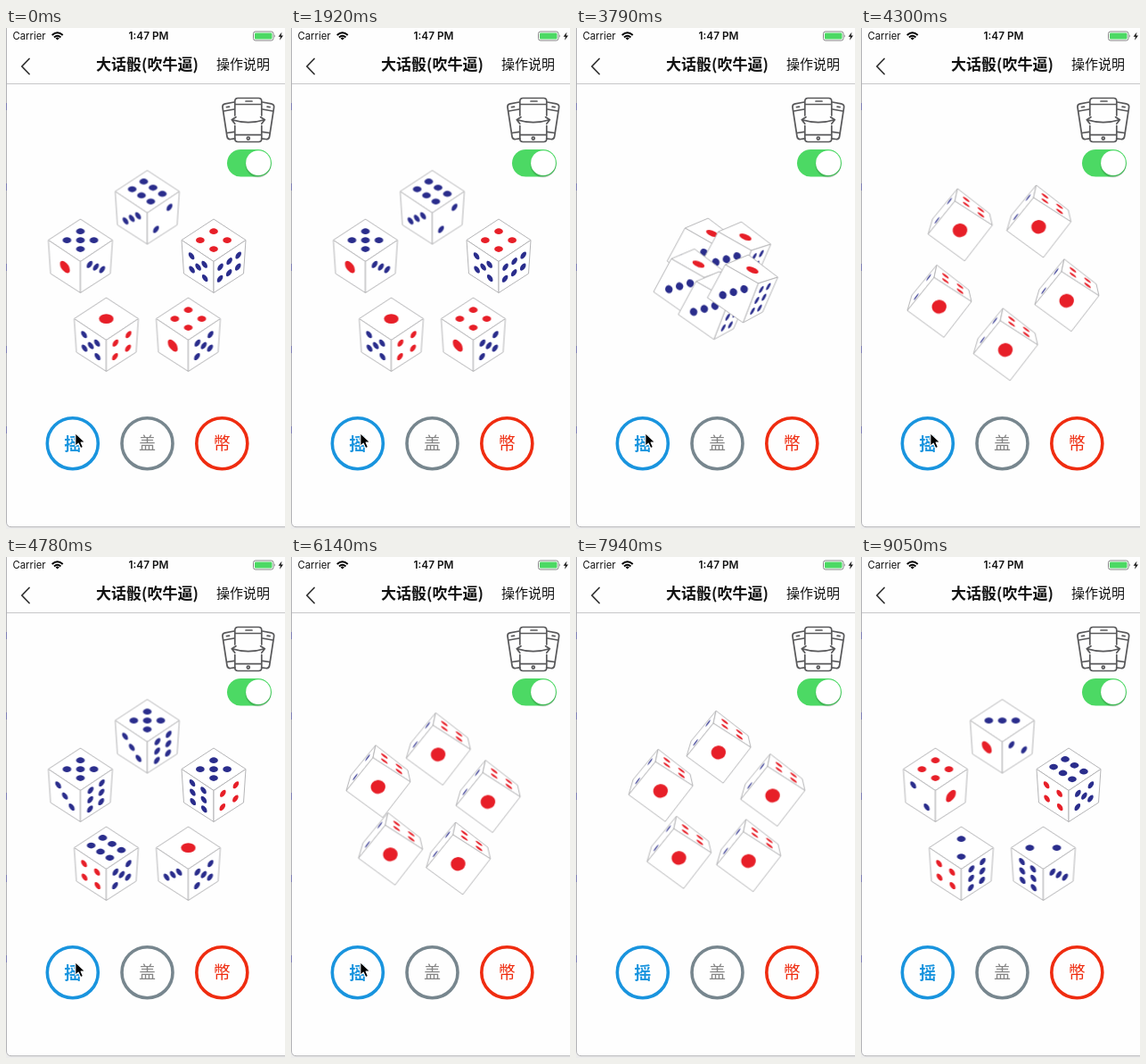
Animation, 313 px wide and 561 px high, one loop 9.1 s. Source, as an HTML page:

```html
<!DOCTYPE html>
<html lang="zh-CN">
<head>
<meta charset="utf-8">
<title>大话骰</title>
<style>
  html, body { margin: 0; width: 100%; height: 100%; overflow: hidden; background: #fff; }
  svg { display: block; width: 313px; height: 561px; }
  text { font-family: "Noto Sans CJK SC", "Noto Sans CJK JP", "Noto Sans CJK", sans-serif; text-anchor: middle; }
  .latin { font-family: Inter, Roboto, sans-serif; }
  .line { fill: none; stroke-linecap: round; stroke-linejoin: round; }
  .face { fill: #fff; stroke: #b4b4b6; stroke-width: 1; stroke-linejoin: round; }
  .die { animation: spiral 9100ms ease-in-out infinite; }
  .pose { animation: 9100ms step-end infinite; }
  #cursor { animation: leave 9100ms linear infinite; }
</style>
</head>
<body>
<svg viewBox="0 0 313 561">
  <rect width="313" height="561" fill="#fefefe"/>
  <path d="M0 553Q0 559 6 559H313V561H0Z" fill="#ececec"/>
  <path class="line" d="M.5 0V553Q.5 558.7 6 558.7H313" stroke="#b2b2b5"/>
  <path d="M.5 84v8m0 82v8m0 82v8m0 84v8m0 82v8" stroke="#7f7fb4"/>

  <g class="latin" fill="#111">
    <text class="latin" x="26" y="13.3" font-size="11.3">Carrier</text>
    <text class="latin" x="160" y="13.3" font-size="11.8" font-weight="600">1:47 PM</text>
  </g>
  <g class="line" stroke="#000" stroke-width="2" style="stroke-linecap:butt">
    <path d="M51.7 8Q57.7 2.4 63.7 8M54 10.4Q57.7 7 61.4 10.4"/>
    <path d="M55.6 11.4Q57.7 9.7 59.8 11.4L57.7 13.6Z" fill="#000" stroke="none"/>
  </g>
  <rect x="277.5" y="4" width="22.5" height="10" rx="2.4" fill="none" stroke="#777" stroke-width=".9"/>
  <rect x="279" y="5.5" width="19.5" height="7" rx="1" fill="#4cd964"/>
  <path d="M301.2 7.2q1.6 1.8 0 3.6z" fill="#777"/>
  <path d="M309.5 4.5L305.6 9.7H308L306.9 13.7L311 8.4H308.5Z" fill="#111"/>

  <path class="line" d="M26 34.5L17.8 43L26 51.5" stroke="#333" stroke-width="1.8"/>
  <text x="158.5" y="47" font-size="17" font-weight="700" fill="#111">大话骰(吹牛逼)</text>
  <text x="266" y="46.3" font-size="15" fill="#111">操作说明</text>
  <path d="M1 62.5H313" stroke="#c6c6c8"/>

  <g class="line" stroke="#58585a" stroke-width="1.7">
    <g id="side">
      <path d="M256 83L246 84.8Q242.4 85.5 243 89L248 121.5Q248.6 125 252 124.5L257 123.8M244.5 93L256 91M248 117.5L256 116.3"/>
      <path d="M247.5 88.7l3-.5"/>
    </g>
    <use href="#side" transform="matrix(-1 0 0 1 543.6 0)"/>
    <path d="M256.8 98V82Q256.8 78.5 260.3 78.5H283.3Q286.8 78.5 286.8 82V98M256.8 109.5V124Q256.8 127.5 260.3 127.5H283.3Q286.8 127.5 286.8 124V109.5M257 85.5H286.6M257 119.7H286.6M269 82H276"/>
    <circle cx="271.8" cy="123.6" r="1.5"/>
    <path d="M253.5 102.8Q271.8 108.6 290.1 102.8M258 99.8L253.3 102.8L256.8 107.3M285.6 99.8L290.3 102.8L286.8 107.3"/>
  </g>

  <rect x="248" y="136" width="50" height="30.5" rx="15.25" fill="#4cd964"/>
  <circle cx="283" cy="153" r="14.4" fill="#000" opacity=".15"/>
  <circle cx="283" cy="151.2" r="13.9" fill="#fff"/>

  <g fill="none" stroke-width="3.6">
    <circle cx="74.8" cy="465.2" r="28.5" stroke="#1994de"/>
    <circle cx="158.5" cy="465.2" r="28.5" stroke="#77868e"/>
    <circle cx="242.3" cy="465.2" r="28.5" stroke="#ef2c10"/>
  </g>
  <g font-size="19">
    <text x="74.8" y="472.5" font-weight="700" fill="#1994de">摇</text>
    <text x="158.5" y="472" fill="#858585">盖</text>
    <text x="242.3" y="472" fill="#ef2c10" font-weight="500">幣</text>
  </g>

  <g id="dice" transform="translate(157.5 279)"></g>

  <g id="cursor">
    <path d="M77.8 453.5V468.2L81.2 465.1L83.7 470.6L86.5 469.4L84.1 464.1H88.8Z" fill="#000" stroke="#fff" stroke-width="1.1" stroke-linejoin="round"/>
  </g>
</svg>
<script>
const LOOP = 9100, ROLLS = [1984, 5785], HALF = 1250, PIC = 300, ROLL = 9 * PIC;
const BLUE = '#2a2d8c', RED = '#e71f28';
const pct = ms => (ms / LOOP * 100).toFixed(4) + '%';

// Pip places in a unit face; a negative value turns the layout.
function pips(value) {
  const n = Math.abs(value), d = .21, list = [];
  if (n === 6) {
    for (const a of [-.29, 0, .29]) for (const b of [-.18, .18]) list.push(value > 0 ? [a, b] : [b, a]);
    return list;
  }
  const k = value < 0 ? -d : d;
  if (n % 2) list.push([0, 0]);
  if (n > 1) list.push([-d, -k], [d, k]);
  if (n > 3) list.push([-d, k], [d, -k]);
  return list;
}

function face([p, q, r, s], value) {
  const mid = i => (p[i] + q[i] + r[i] + s[i]) / 4;
  const u = i => (q[i] + r[i] - p[i] - s[i]) / 2;
  const v = i => (s[i] + r[i] - p[i] - q[i]) / 2;
  const m = [u(0), u(1), v(0), v(1), mid(0), mid(1)];
  const dots = pips(value).map(([a, b]) =>
    `<circle cx="${a}" cy="${b}" r="${value === 1 ? .16 : .095}"/>`).join('');
  const color = value === 1 || value === 4 ? RED : BLUE;
  return `<polygon class="face" points="${[p, q, r, s].join(' ')}"/>` +
    `<g fill="${color}" transform="matrix(${m})">${dots}</g>`;
}

function restDie([top, left, right]) {
  const T = [0, -41], L = [-36, -17.5], R = [36, -17.5], M = [0, 6.5],
        B = [0, 41.5], l = [-33.5, 20], r = [33.5, 20];
  return face([T, R, M, L], top) + face([L, M, B, l], left) + face([M, R, r, B], right);
}

const tumbles = [
  face([[-19, -27], [7, -38], [40, -13], [18, -6]], 1) +
    face([[18, -6], [40, -13], [23, 26], [1, 38]], -6) +
    face([[-19, -27], [18, -6], [1, 38], [-39, 10]], -3),
  face([[-36, 11], [-31, -6], [-3, -40], [-6, -26]], 2) +
    face([[-6, -26], [-3, -40], [33, -12], [36, 1]], 4) +
    face([[-6, -26], [36, 1], [5, 41], [-36, 11]], 1),
  face([[-9, -36], [36, -9], [9, 36], [-36, 9]], 5)
];

// Ring place and the three results of each die, back to front.
const dice = [
  { at: [47, 64], shows: [[4, 1, 5], [1, -3, 5], [-2, -6, 3]] },
  { at: [-45, 64], shows: [[1, 5, 4], [6, 4, 5], [2, 4, -6]] },
  { at: [75.5, -24], shows: [[4, 5, 6], [5, -6, 4], [6, 4, 5]] },
  { at: [1, -78.5], shows: [[6, -3, -2], [5, 3, -6], [-3, 1, 2]] },
  { at: [-74, -24], shows: [[5, 1, 3], [5, 3, -6], [4, 2, 1]] }
];

const pose = (name, art) => `<g class="pose" style="animation-name:${name}">${art}</g>`;
document.getElementById('dice').innerHTML = dice.map(({ at: [x, y], shows }) =>
  `<g class="die" style="--x:${x}px;--y:${y}px">` +
  shows.map((s, i) => pose('rest' + i, restDie(s))).join('') +
  tumbles.map((art, i) => pose('tumble' + i, art)).join('') + '</g>').join('');

const visible = (name, spans) => `@keyframes ${name}{0%{opacity:0}` +
  spans.map(([a, b]) => `${pct(a)}{opacity:1}${pct(b)}{opacity:0}`).join('') + '}';

const [r1, r2] = ROLLS;
const rules = [[0, r1], [r1 + ROLL, r2], [r2 + ROLL, LOOP]].map((s, i) => visible('rest' + i, [s]));
for (let i = 0; i < 3; i++) {
  const spans = [];
  for (const start of ROLLS)
    for (let k = 0; k < 3; k++) {
      const a = start + (3 * k + i) * PIC;
      spans.push([a, a + PIC]);
    }
  rules.push(visible('tumble' + i, spans));
}

// Each roll spirals to the centre and out again: five turns, dice stay upright.
const place = (ms, deg, far) => `${pct(ms)}{transform:rotate(${deg}deg) ` +
  `translate(${far ? 'var(--x),var(--y)' : '0px,0px'}) rotate(${-deg}deg)}`;
const steps = [place(0, 0, 1)];
ROLLS.forEach((t, i) => {
  const deg = i * 1800;
  steps.push(place(t, deg, 1), place(t + HALF, deg + 900, 0), place(t + 2 * HALF, deg + 1800, 1));
});
steps.push(place(LOOP, 3600, 1));
rules.push(`@keyframes spiral{${steps.join('')}}`);

const shift = (ms, x, y) => `${pct(ms)}{transform:translate(${x}px,${y}px)}`;
rules.push(`@keyframes leave{${[shift(0, 0, 0), shift(7380, 0, 0), shift(7590, 1, 33),
  shift(7820, 4, 115), shift(LOOP, 4, 115)].join('')}}`);

document.head.appendChild(document.createElement('style')).textContent = rules.join('\n');
</script>
</body>
</html>
```
